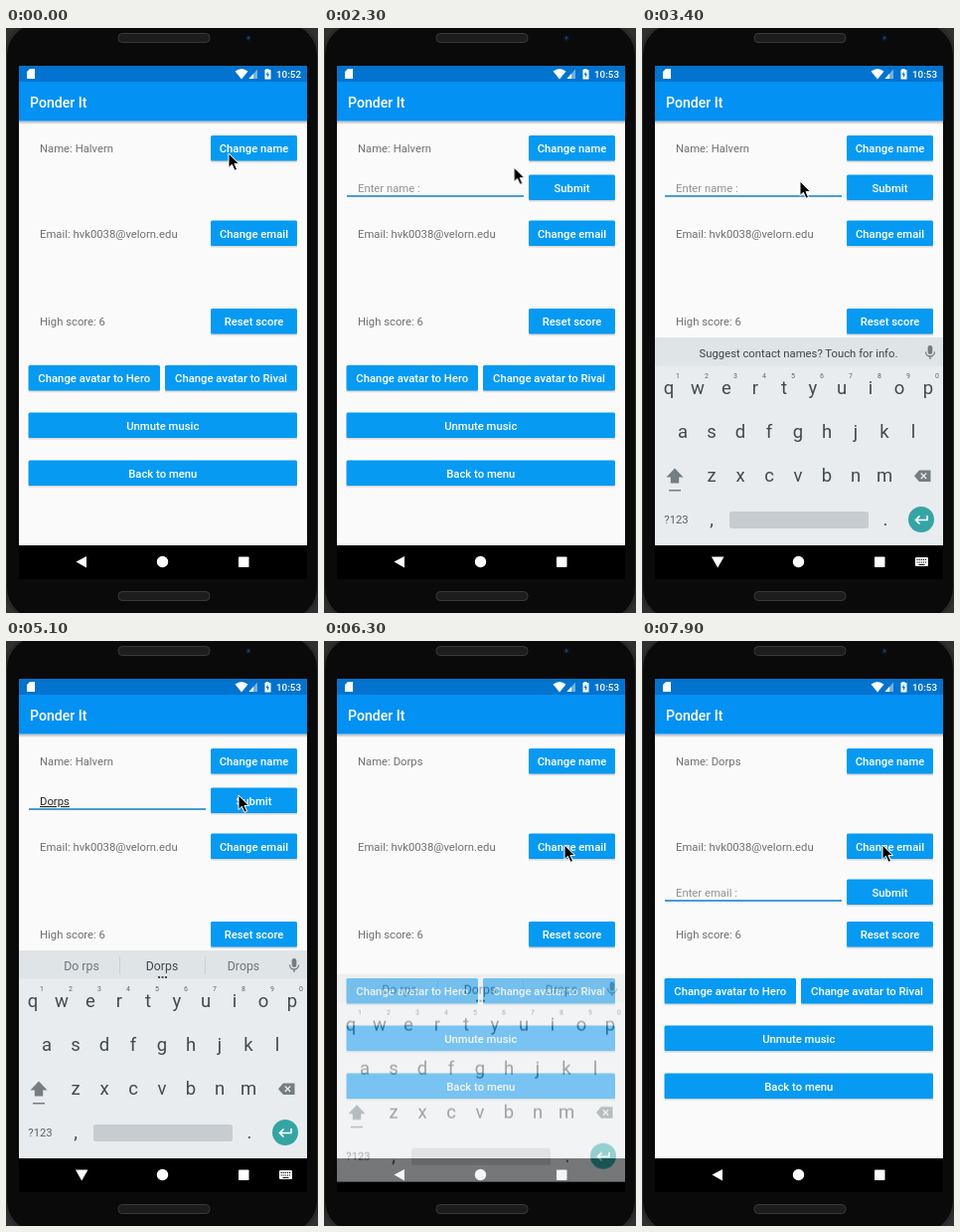
An HTML page for the animation above (8000 ms loop, 314 px wide and 588 px high).

```html
<!DOCTYPE html>
<html lang="en">
<head>
<meta charset="utf-8">
<title>Settings screen</title>
<style>
html, body { margin: 0; width: 100%; height: 100%; overflow: hidden; background: #303030; }
svg { display: block; width: 314px; height: 588px; font: 11.3px Roboto, sans-serif; }
text { white-space: pre; }
.mid { text-anchor: middle; }
.btn { fill: #fff; font-weight: 500; }
.body { fill: #707070; }
.key { font-size: 18.5px; fill: #414a4f; }
.num { font-size: 7px; fill: #5c656a; }
.sug { font-size: 12.3px; fill: #6d767b; }
.soft { fill: #747d82; }
#board { animation: board 8s infinite; }
#mouse { animation: mouse 8s infinite ease-in-out; }
@keyframes board {
  0%, 35.625% { opacity: 0; transform: translateY(48px); animation-timing-function: cubic-bezier(.23, 1, .32, 1); }
  38.125% { opacity: 1; transform: none; }
  77.075% { opacity: 1; transform: none; animation-timing-function: cubic-bezier(.755, .05, .855, .06); }
  78.95%, 100% { opacity: 0; transform: translateY(48px); }
}
@keyframes mouse {
  0%, 26.25% { transform: translate(224px, 126px); }
  31.25%, 57.5% { transform: translate(159px, 154px); }
  62.5%, 73.75% { transform: translate(234px, 155px); }
  77%, 100% { transform: translate(242px, 205px); }
}
</style>
</head>
<body>
<svg viewBox="0 0 314 588">
  <defs>
    <linearGradient id="shade" x2="0" y2="1">
      <stop stop-color="#000" stop-opacity=".28"/>
      <stop offset="1" stop-color="#000" stop-opacity="0"/>
    </linearGradient>
    <clipPath id="screen"><rect x="13" y="38" width="290" height="516"/></clipPath>
  </defs>

  <!-- phone body -->
  <rect x="-.5" y="-6" width="315" height="602" rx="34" fill="#0a0a0a" stroke="#292929" stroke-width="3"/>
  <g fill="#1d1d1d" stroke="#393939">
    <rect x="113" y="5.5" width="92" height="9" rx="4"/>
    <rect x="113" y="566.5" width="92" height="9" rx="4"/>
  </g>
  <circle cx="244" cy="10" r="3" fill="#0b1526"/>
  <circle cx="244" cy="10" r="1.4" fill="#1c3c66"/>

  <g clip-path="url(#screen)">
    <rect x="13" y="38" width="290" height="482" fill="#fafafa"/>
    <rect x="13" y="93.5" width="290" height="3.5" fill="url(#shade)"/>
    <rect x="13" y="54" width="290" height="39.5" fill="#0391f4"/>
    <rect x="13" y="38" width="290" height="16" fill="#0273ce"/>

    <!-- status bar -->
    <g fill="#fff">
      <path d="M24 41h5v10h-8v-7z"/>
      <path d="M230.5 43.5Q237 38.500 243.500 43.5L237 51.5z"/>
      <path d="M253 41.500V51H244.500z" fill-opacity=".45"/>
      <path d="M249 46V51H244.500z"/>
      <path d="M261.500 41h3v1h2v9.500h-6v-9.500h1z"/>
      <path d="M263.600 43.500l-2 3.500h1.400v3l2-3.700h-1.400z" fill="#0273ce"/>
      <text id="clock" x="297" y="49.700" text-anchor="end" font-size="9.9" font-weight="500"></text>
      <text x="24" y="80" font-size="14.1" font-weight="500">Ponder It</text>
    </g>

    <g class="body">
      <text id="person" x="34" y="125"></text>
      <text x="34" y="211">Email: hvk0038@velorn.edu</text>
      <text x="34" y="299">High score: 6</text>
    </g>
    <g id="buttons"></g>

    <g id="field">
      <rect x="23" y="168.200" width="178" height="1.600" fill="#1c87cf"/>
      <text id="hint" x="34" y="165" fill="#929292"></text>
      <text id="typed" x="34" y="165" fill="#262626" text-decoration="underline"></text>
      <rect id="caret" x="34" y="153" width="1.500" height="15" fill="#1c87cf"/>
    </g>

    <!-- navigation bar -->
    <rect x="13" y="520" width="290" height="34" fill="#000"/>
    <g fill="#fff">
      <path id="back" d="M70.500 536.500L81 531V542.500z"/>
      <circle cx="157.500" cy="536.500" r="5.700"/>
      <rect x="234" y="531.500" width="10.500" height="10.500" rx=".7"/>
      <g id="down">
        <path d="M70 531.500H82.500L76.200 542.500z"/>
        <rect x="275" y="532" width="13" height="9" rx="1"/>
        <path d="M276.500 534.500h10M276.500 537h10" stroke="#000" stroke-dasharray="1.200 .9"/>
        <path d="M278.500 539.400h6" stroke="#000"/>
      </g>
    </g>

    <g id="board">
      <rect x="13" y="311" width="290" height="209" fill="#e8ecef"/>
      <rect x="13" y="311" width="290" height="28.500" fill="#dfe4e7"/>
      <text id="tip" class="mid" x="157.500" y="330.500" fill="#3c4448">Suggest contact names? Touch for info.</text>
      <g id="strip">
        <path d="M114.500 317v18M200.500 317v18" stroke="#cbd1d4"/>
        <text class="sug mid" x="76" y="330.500"></text>
        <text class="sug mid" x="157" y="330.500" style="fill:#3f484d"></text>
        <text class="sug mid" x="239" y="330.500"></text>
        <path d="M153 338h9" stroke="#3f484d" stroke-width="2" stroke-dasharray="2 1.500"/>
      </g>
      <g class="soft">
        <rect x="287.700" y="319" width="4.600" height="9" rx="2.300"/>
        <path d="M285.500 325.500a4.500 4.500 0 0 0 9 0M290 330v3" fill="none" stroke="#747d82" stroke-width="1.300"/>
        <path d="M33 442.500L41.500 451.500H37.200V457.500H28.800V451.500H24.500z"/>
        <rect x="27" y="464" width="12" height="1.500"/>
        <path d="M279 444.500H290.500V456H279L274 450.200z"/>
        <path d="M280.700 447.500l5.500 5.500m0-5.500l-5.500 5.500" stroke="#e8ecef" stroke-width="1.300"/>
      </g>
      <g id="keys"></g>
      <text class="mid" x="34.500" y="498" fill="#596166">?123</text>
      <rect x="88" y="486" width="140" height="17" rx="2.500" fill="#c7ccd0"/>
      <circle cx="281" cy="494" r="13" fill="#35a5a4"/>
      <path d="M287 490v4.500H275.500m4-4l-4 4l4 4" fill="none" stroke="#fff" stroke-width="1.600"/>
    </g>
  </g>

  <path id="mouse" d="M0 0V14.500L3.400 11.300L6 17.300L8.600 16.200L6 10.400H10.600z" fill="#000" stroke="#fff"/>
</svg>

<script>
const LOOP = 8000;
const $ = id => document.getElementById(id);
const within = (t, from, to) => t >= from && t < to;
const show = (id, on) => $(id).style.display = on ? '' : 'none';
const write = (el, s) => { if (el.textContent !== s) el.textContent = s; };
const label = (cls, x, y, s) => `<text class="${cls} mid" x="${x}" y="${y}">${s}</text>`;

const button = (x, mid, w, s) => `
  <rect x="${x}" y="${mid + 11}" width="${w}" height="4" rx="1.5" fill="url(#shade)"/>
  <rect x="${x}" y="${mid - 13}" width="${w}" height="25.5" rx="1.5" fill="#079af2"/>
  ${label('btn', x + w / 2, mid + 4, s)}`;

$('buttons').innerHTML = [
  [206, 121, 87, 'Change name'], [206, 206.5, 87, 'Change email'], [206, 295, 87, 'Reset score'],
  [22.5, 352, 132.5, 'Change avatar to Hero'], [160, 352, 133, 'Change avatar to Rival'],
  [22.5, 399.5, 270.5, 'Unmute music'], [22.5, 447.5, 270.5, 'Back to menu']
].map(b => button(...b)).join('');
$('field').insertAdjacentHTML('beforeend', button(206, 160.5, 87, 'Submit'));

const row = (letters, x, y) => [...letters].map((c, i) => label('key', x + i * 29, y, c)).join('');
$('keys').innerHTML = row('qwertyuiop', 27, 368) + row('asdfghjkl', 41, 412) +
  row('zxcvbnm', 70, 456) + row(',', 70, 500) + row('.', 245, 500) +
  [...'1234567890'].map((c, i) => label('num', 36 + i * 29, 351.5, c)).join('');

const NAME = 'Dorps';
const FOCUS = 2650, TYPE = 3850, KEY_GAP = 150, SUBMIT = 5900;
const guesses = [['A', 'Do'], ['Di', 'Don’t'], ['Dot', 'Door'], ['Dorm', 'Drop'], ['Do rps', 'Drops']];
const slots = $('strip').querySelectorAll('text');

function render(t) {
  const count = t < TYPE ? 0 : Math.min(NAME.length, Math.floor((t - TYPE) / KEY_GAP) + 1);
  const typed = NAME.slice(0, count);
  const naming = within(t, 1950, SUBMIT), mailing = t >= 7500;

  write($('clock'), t < 800 ? '10:52' : '10:53');
  write($('person'), 'Name: ' + (t < SUBMIT ? 'Halvern' : NAME));

  show('field', naming || mailing);
  $('field').setAttribute('transform', `translate(0 ${mailing ? 92 : 0})`);
  write($('hint'), mailing ? 'Enter email :' : count ? '' : 'Enter name :');
  write($('typed'), naming ? typed : '');

  // the caret blinks anew after each key
  const lastKey = count ? TYPE + (count - 1) * KEY_GAP : FOCUS;
  show('caret', naming && t >= FOCUS && (t - lastKey) % 1000 < 500);
  $('caret').setAttribute('x', 34 + (naming && count ? $('typed').getComputedTextLength() : 0));

  const open = within(t, 2680, 6180);
  show('down', open);
  show('back', !open);

  show('tip', !count);
  show('strip', count);
  if (count) {
    const [left, right] = guesses[count - 1];
    [left, typed, right].forEach((s, i) => write(slots[i], s));
  }
}

let start;
function tick(now) {
  start ??= now;
  render((now - start) % LOOP);
  requestAnimationFrame(tick);
}
render(0);
requestAnimationFrame(tick);
</script>
</body>
</html>
```
